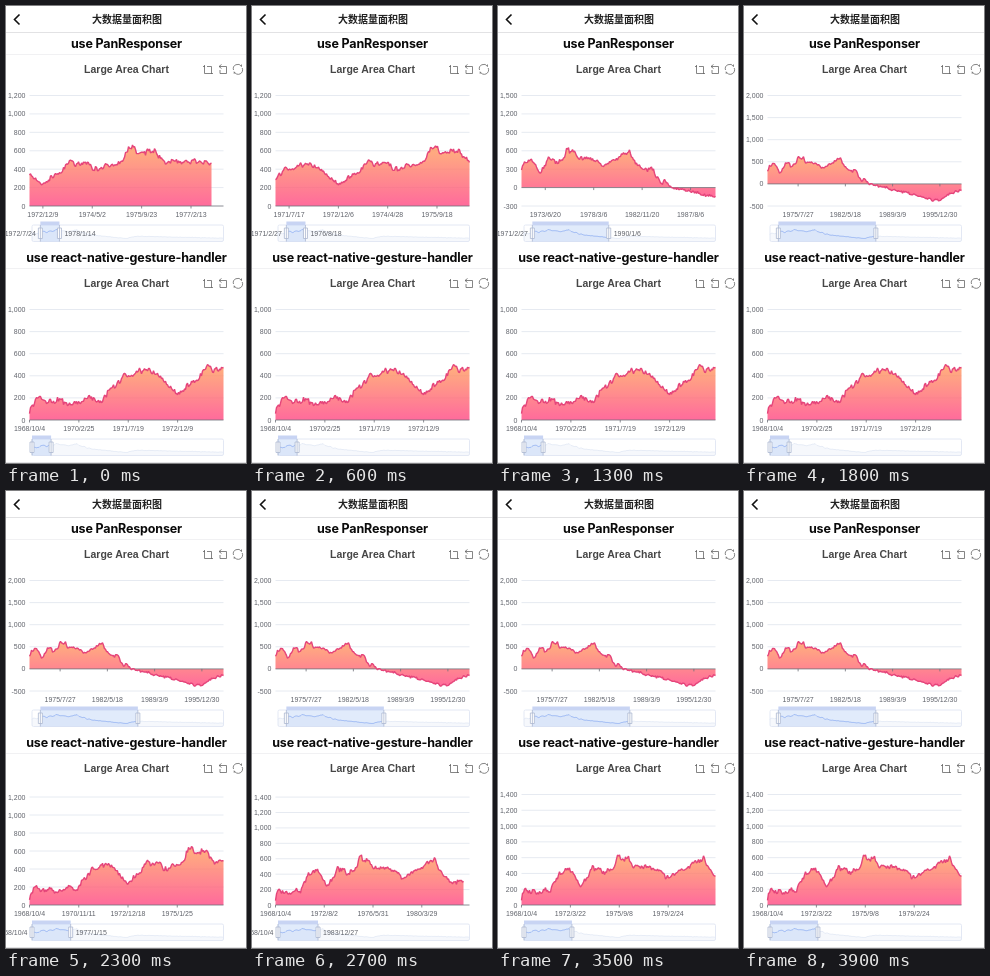
Animation of 240 by 457 pixels, one loop 4 s. Source, as an HTML page:

```html
<!DOCTYPE html>
<html lang="zh">
<head>
<meta charset="utf-8">
<title>大数据量面积图</title>
<style>
html, body { margin: 0; width: 100%; height: 100%; overflow: hidden; background: #fff; }
svg { display: block; width: 240px; height: 457px; }
.head { font: 700 12.5px Inter, sans-serif; letter-spacing: -.15px; fill: #0a0a0a; text-anchor: middle; }
.nav { font: 700 10px "Noto Sans CJK SC", "Noto Sans CJK", sans-serif; fill: #222; text-anchor: middle; }
.title { font: 700 10.5px "Liberation Sans", Arial, sans-serif; fill: #464646; text-anchor: middle; }
.label { font: 7px "Liberation Sans", Arial, sans-serif; fill: #60636b; }
.icon { fill: none; stroke: #666; stroke-width: .8; }
</style>
</head>
<body>
<svg id="stage" viewBox="0 0 240 457">
  <defs>
    <linearGradient id="warm" x1="0" y1="0" x2="0" y2="1">
      <stop offset="0" stop-color="#ff9e5c"/>
      <stop offset="1" stop-color="#ff4683"/>
    </linearGradient>
  </defs>
  <rect width="240" height="457" fill="#fff"/>
  <path d="M0 26.5H240M0 456.5H240" stroke="#e2e2e4"/>
  <path d="M13.5 8.5L8.5 13.5L13.5 18.5" fill="none" stroke="#111" stroke-width="1.6"/>
  <text class="nav" x="121" y="17">大数据量面积图</text>
</svg>
<script>
const NS = 'http://www.w3.org/2000/svg';
const stage = document.getElementById('stage');
const LEFT = 23.5, WIDTH = 194, RIGHT = LEFT + WIDTH;
const TOP = 89.5, BASE = 200;
const DAYS = 20000, LOOP = 4000, FRAME = 100;

// turning points of the series: day, value
const KEYS = [
  [0, 90], [85, 205], [170, 165], [340, 180], [425, 140], [550, 165], [612, 230], [735, 140], [840, 310],
  [1000, 400], [1170, 455], [1305, 425], [1460, 265], [1565, 250], [1740, 410], [1850, 485], [1930, 440],
  [2000, 500], [2100, 400], [2300, 440], [2400, 490], [2520, 660], [2585, 580], [2770, 595], [2880, 470],
  [3157, 490], [3640, 410], [3780, 335], [3973, 395], [4300, 465], [4560, 570], [4720, 585], [4850, 435],
  [5231, 285], [5500, 320], [5840, 40], [5954, 140], [6219, 0], [8350, -220], [9900, -390], [10350, -240],
  [11086, -140], [DAYS, -350]
];

const lerp = (a, b, p) => a + (b - a) * p;

// piecewise linear rows [position, ...values], held at both ends
function blend(rows, at) {
  const i = rows.findIndex(r => r[0] > at);
  if (i === 0) return rows[0].slice(1);
  if (i < 0) return rows[rows.length - 1].slice(1);
  const a = rows[i - 1], b = rows[i], p = (at - a[0]) / (b[0] - a[0]);
  return a.slice(1).map((v, n) => lerp(v, b[n + 1], p));
}
function hash(n) {
  const v = Math.sin(n * 127.1 + 31.7) * 43758.5453;
  return (v - Math.floor(v)) * 2 - 1;
}
function ripple(d, size) {
  const i = Math.floor(d / size);
  return lerp(hash(i + size * 13), hash(i + 1 + size * 13), d / size - i);
}
const trend = d => blend(KEYS, d)[0];
const value = d => trend(d) + 27 * ripple(d, 9) + 20 * ripple(d, 24) + 12 * ripple(d, 60);

function dateText(d) {
  const day = new Date(Date.UTC(1968, 9, 4) + Math.round(d) * 864e5);
  return [day.getUTCFullYear(), day.getUTCMonth() + 1, day.getUTCDate()].join('/');
}
const dateStep = w => Math.round(w * (.2547 - 1.07e-10 * w * w));
const slideX = d => 26 + 191 * d / DAYS;

function niceStep(v) {
  const mag = 10 ** Math.floor(Math.log10(v)), f = v / mag;
  return mag * (f < 1.5 ? 1 : f < 2.5 ? 2 : f < 4 ? 3 : f < 7 ? 5 : 10);
}
// value axis with as much headroom as the data is tall
function scaleFor([s, e]) {
  const seen = KEYS.filter(k => k[0] >= s && k[0] <= e).map(k => k[1]).concat(trend(s), trend(e));
  const max = Math.max(...seen), min = Math.min(...seen);
  const top = 2 * max - min, bottom = Math.min(0, min);
  const step = niceStep((top - bottom) / 5);
  const hi = Math.ceil(top / step) * step, lo = Math.floor(bottom / step) * step;
  const k = (BASE - TOP) / (hi - lo);
  return { step, hi, lo, k, zero: BASE + lo * k };
}

function set(el, attrs) {
  for (const k in attrs) el.setAttribute(k, attrs[k]);
}
function add(parent, tag, attrs, text) {
  const el = document.createElementNS(NS, tag);
  set(el, attrs);
  if (text !== undefined) el.textContent = text;
  parent.appendChild(el);
  return el;
}

function makeChart(id, dy, heading) {
  const g = add(stage, 'g', { transform: `translate(0 ${dy})` });
  add(g, 'path', { d: 'M0 48.5H240', stroke: '#f1f1f3' });
  add(g, 'text', { class: 'head', x: 120.5, y: 42 }, heading);
  add(g, 'text', { class: 'title', x: 120.5, y: 67 }, 'Large Area Chart');
  add(g, 'path', { class: 'icon', d: 'M197 60.5H199M201 60.5H205.5V68M198.5 59V67.5H207' });
  add(g, 'path', { class: 'icon', d: 'M215.5 58.5L213 60.5L215.5 62.5M213 60.5H220.500V67.500H214V64' });
  add(g, 'path', { class: 'icon', d: 'M227.5 64A4.400 4.400 0 0 1 235.500 60.500V58.500M236.200 62A4.400 4.400 0 0 1 228.200 65.800V67.800' });
  const grid = add(g, 'path', { stroke: '#e4e8f0', 'stroke-width': .9 });
  const area = add(g, 'path', { fill: 'url(#warm)', 'fill-opacity': .8 });
  const axis = add(g, 'path', { stroke: '#6e7079', 'stroke-width': .8 });
  const line = add(g, 'path', { fill: 'none', stroke: '#e5447a', 'stroke-width': 1.4, 'stroke-linejoin': 'bevel' });
  const labels = add(g, 'g', { class: 'label' });

  let shade = '';
  for (let x = 26; x <= 217; x++) {
    const y = 229 - value((x - 26) / 191 * DAYS) * .009;
    shade += `${shade ? 'L' : 'M'}${x} ${y.toFixed(1)}`;
  }
  add(g, 'path', { d: shade + 'V235H26Z', fill: '#d2dbee', 'fill-opacity': .2 });
  add(g, 'path', { d: shade, fill: 'none', stroke: '#dbe3f2', 'stroke-width': .6 });
  add(g, 'rect', { x: 26, y: 219, width: 191.5, height: 16.5, rx: 1.5, fill: 'none', stroke: '#dce3f1', 'stroke-width': .8 });
  const filler = add(g, 'rect', { y: 219, height: 16.5, fill: '#87aff0', 'fill-opacity': .25 });
  const clip = add(add(g, 'clipPath', { id }), 'rect', { y: 218, height: 18 });
  add(g, 'path', { d: shade, fill: 'none', stroke: '#9db9f5', 'stroke-width': .8, 'clip-path': `url(#${id})` });
  const bar = add(g, 'rect', { y: 215.5, height: 3.5, fill: '#c8d4f3' });
  const handles = add(g, 'path', { fill: '#fff', stroke: '#acb8d1', 'stroke-width': .8 });
  const tips = add(g, 'g', { class: 'label' });

  function drawPlot([s, e], [ps, pe]) {
    // the picture trails the newest window and scale by part of a step
    const ease = .65, now = scaleFor([s, e]), old = scaleFor([ps, pe]);
    const zero = lerp(old.zero, now.zero, ease), k = lerp(old.k, now.k, ease);
    const share = lerp(Math.min(1, (e - s) / (pe - ps)), 1, ease);
    const count = Math.round(WIDTH * share);
    let d = '';
    for (let i = 0; i <= count; i++) {
      const y = zero - k * value(lerp(s, e, i / count));
      d += `${i ? 'L' : 'M'}${LEFT + i} ${y.toFixed(2)}`;
    }
    set(line, { d });
    set(area, { d: `${d}V${zero}H${LEFT}Z` });

    labels.textContent = '';
    let rules = '', ticks = `M${LEFT} ${zero}H${RIGHT}`;
    for (let v = now.lo; v <= now.hi; v += now.step) {
      const y = zero - k * v;
      if (y < TOP - 1 || y > BASE + 1) continue;
      if (v) rules += `M${LEFT} ${y}H${RIGHT}`;
      add(labels, 'text', { x: 19.5, y: y + 2.5, 'text-anchor': 'end' }, v.toLocaleString('en-US'));
    }
    const step = dateStep(e - s);
    for (let n = Math.ceil(s / step) * step; n <= e; n += step) {
      const x = LEFT + WIDTH * (n - s) / (e - s);
      ticks += `M${x} ${zero}v2.5`;
      add(labels, 'text', { x, y: 210.5, 'text-anchor': 'middle' }, dateText(n));
    }
    set(grid, { d: rules });
    set(axis, { d: ticks });
  }

  function drawSlider([s, e], lead, dragging) {
    const [a, b] = lead.map(slideX);
    for (const el of [filler, bar, clip]) set(el, { x: a, width: b - a });
    set(handles, { d: [a, b].map(x => `M${x} 219V235.5M${x - 2} 222h4v10.500h-4z`).join('') });
    tips.textContent = '';
    if (!dragging) return;
    add(tips, 'text', { x: a - 4.5, y: 229.5, 'text-anchor': 'end' }, dateText(s));
    add(tips, 'text', { x: b + 5, y: 229.5 }, dateText(e));
  }

  return (drag, t, dragging) => {
    const view = blend(drag, t);
    drawPlot(view, blend(drag, t - FRAME));
    drawSlider(view, blend(drag, t + FRAME), dragging);
  };
}

// drag paths: time, first day, last day of the window
const panDrag = [
  [-100, 1389, 3819], [0, 1389, 3389], [100, 876, 2875], [700, 876, 2875],
  [900, 876, 10500], [1000, 876, 5894], [1100, 876, 5550], [1600, 876, 11086]
];
const gestureDrag = [
  [2200, 0, 2000], [2600, 0, 6100], [2700, 0, 5562], [2800, 0, 4190],
  [3100, 0, 13000], [3200, 0, 4928], [3300, 0, 5019]
];
const drawPan = makeChart('pickPan', 0, 'use PanResponser');
const drawGesture = makeChart('pickGesture', 214, 'use react-native-gesture-handler');

function draw(t) {
  drawPan(panDrag, t, t < 1700);
  drawGesture(gestureDrag, t, t >= 2200 && t < 3500);
}

let start, last = 0;
function tick(now) {
  if (start === undefined) start = now;
  const t = Math.floor((now - start) % LOOP / FRAME) * FRAME;
  if (t !== last) draw(last = t);
  requestAnimationFrame(tick);
}
draw(0);
requestAnimationFrame(tick);
</script>
</body>
</html>
```
